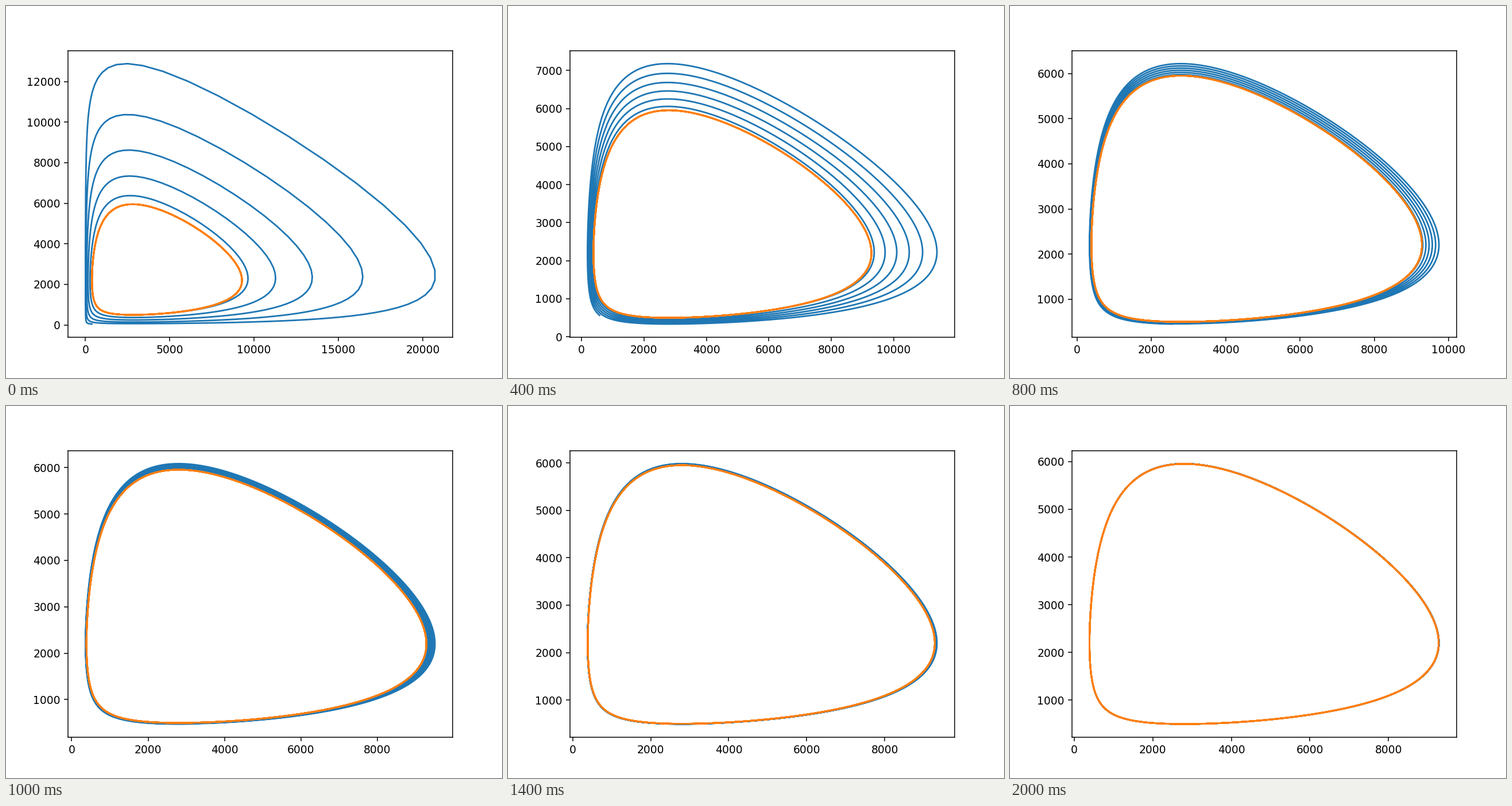
A matplotlib script that plays this animation: 864x648 px, repeating every 2.2 s.

```python
import matplotlib.pyplot as plt
import numpy as np
from matplotlib.animation import FuncAnimation

# Predator-prey model: Euler paths with a halving step against a precise path
GROWTH, HUNT = 1.1, 0.0005
FEED, DEATH = 0.00025, 0.7
START = (3000.0, 500.0)
T_END = 50.0
FIRST_STEP = 0.05
FRAMES = 11


def euler(dt, keep):
    """Explicit Euler path, storing every keep-th point."""
    x, y = START
    pts = [START]
    for i in range(1, round(T_END / dt) + 1):
        x, y = (x + dt * x * (GROWTH - HUNT * y),
                y + dt * y * (FEED * x - DEATH))
        if i % keep == 0:
            pts.append((x, y))
    return np.array(pts).T


def slope(p):
    x, y = p
    return np.array([x * (GROWTH - HUNT * y), y * (FEED * x - DEATH)])


def runge_kutta(dt):
    p = np.array(START)
    pts = [p]
    for _ in range(round(T_END / dt)):
        k1 = slope(p)
        k2 = slope(p + dt / 2 * k1)
        k3 = slope(p + dt / 2 * k2)
        k4 = slope(p + dt * k3)
        p = p + dt / 6 * (k1 + 2 * k2 + 2 * k3 + k4)
        pts.append(p)
    return np.array(pts).T


exact = runge_kutta(0.01)
paths = [euler(FIRST_STEP / 2**k, 2**max(0, k - 4)) for k in range(FRAMES)]

plt.rcParams["font.family"] = "DejaVu Sans"
fig, ax = plt.subplots(figsize=(6.4, 4.8), dpi=135)


def draw(k):
    ax.clear()
    ax.plot(*paths[k], color="tab:blue")
    ax.plot(*exact, color="tab:orange")
    return ax.lines


anim = FuncAnimation(fig, draw, frames=FRAMES, init_func=lambda: draw(0),
                     interval=200, repeat=True)
plt.show()
```
